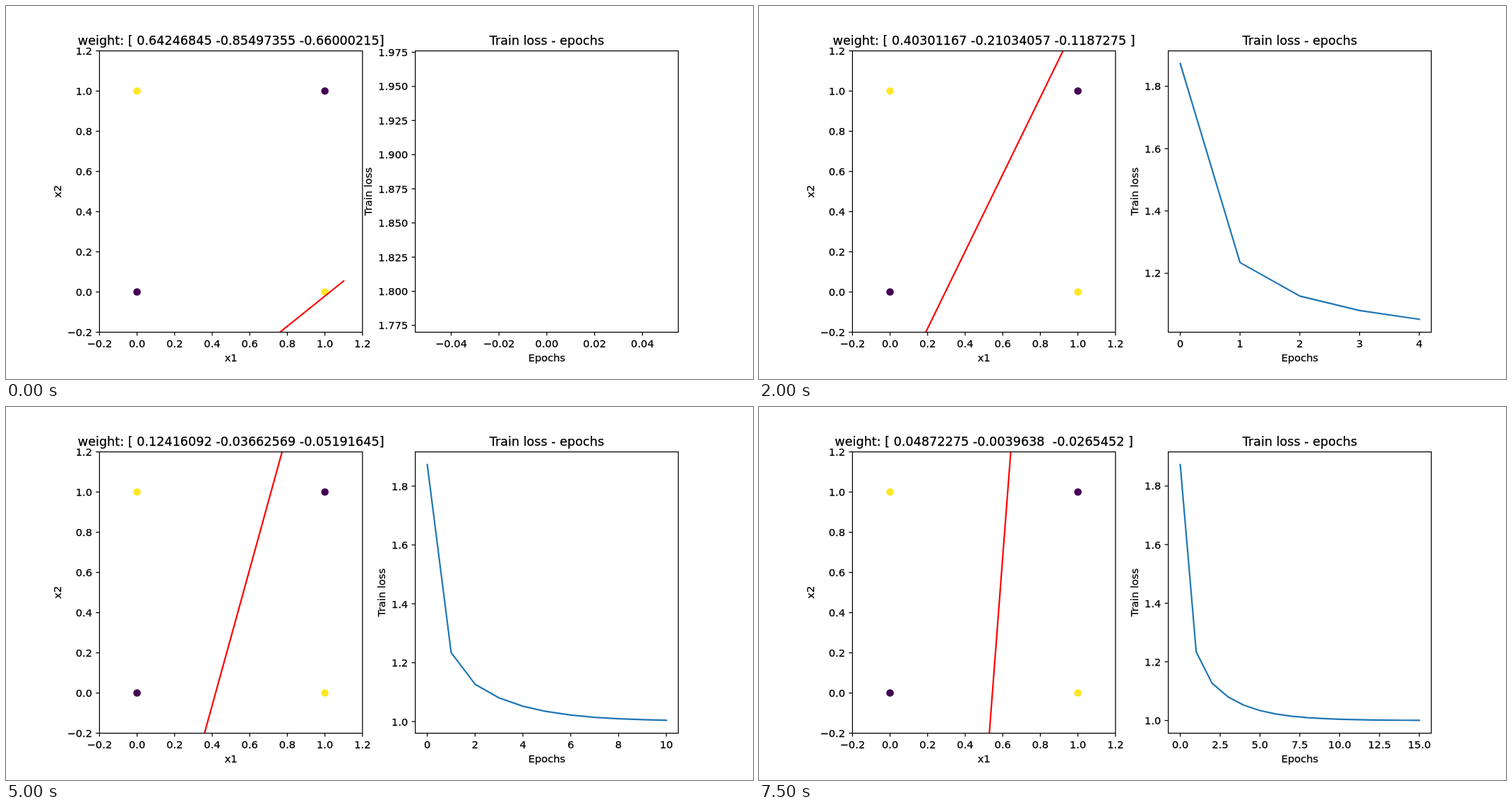
These frames come from a looping animation (1058 px wide and 529 px high, 8000 ms). An HTML page:

```html
<!DOCTYPE html>
<html lang="en">
<head>
<meta charset="utf-8">
<title>Training a linear model on XOR</title>
<style>
  html, body { margin: 0; width: 100%; height: 100%; overflow: hidden; background: #fff; }
  svg { display: block; width: 1058px; height: 529px; }
  text { font: 14.694px "DejaVu Sans", sans-serif; fill: #000; stroke: #000; stroke-width: .25px; }
  .title { font-size: 17.633px; }
  .mid { text-anchor: middle; }
  .end { text-anchor: end; }
  .axis { fill: none; stroke: #000; stroke-width: 1.25; }
  .plot { fill: none; stroke-width: 2.2; stroke-linecap: square; stroke-linejoin: round; }
</style>
</head>
<body>
<svg id="stage" viewBox="0 0 1058 529"></svg>
<script>
const STEP_MS = 500, EPOCHS = 16, RATE = 0.8;
const TOP = 63.5, BOTTOM = 462.5, WIDTH = 372.5;
const LEFT_X = 132.4, RIGHT_X = 579.7;
const stage = document.getElementById('stage');

// Gradient descent on mean squared error; XOR targets of ±1 cancel out of the gradient.
const moments = [[.5, .25, .5], [.25, .5, .5], [.5, .5, 1]];
const dot = (a, b) => a.reduce((sum, v, i) => sum + v * b[i], 0);
const gradient = w => moments.map(row => dot(row, w));

const weights = [[0.64246845, -0.85497355, -0.66000215]];
while (weights.length < EPOCHS) {
  const w = weights.at(-1), g = gradient(w);
  weights.push(w.map((v, i) => v - RATE * g[i]));
}
const losses = weights.map(w => 1 + dot(w, gradient(w)));

const text = (x, y, str, cls, extra = '') =>
  `<text x="${x}" y="${y}" class="${cls}" ${extra}>${str.replace(/ /g, '\u00a0')}</text>`;

const sideways = (x, str) => {
  const y = (TOP + BOTTOM) / 2;
  return text(x, y, str, 'mid', `transform="rotate(-90 ${x} ${y})"`);
};

// Smallest round step that keeps the axis within the given number of bins.
function ticks([lo, hi], bins) {
  const raw = (hi - lo) / bins;
  const power = Math.floor(Math.log10(raw));
  const lead = [1, 2, 2.5, 5, 10].find(s => s * 10 ** power >= raw - 1e-12);
  const step = lead * 10 ** power;
  const digits = Math.max(0, (lead === 2.5 ? 1 : 0) - power - (lead === 10 ? 1 : 0));
  const list = [];
  for (let i = Math.ceil(lo / step - 1e-9); i * step <= hi + 1e-9; i++) {
    list.push({ value: i * step, label: (i * step).toFixed(digits).replace('-', '\u2212') });
  }
  return list;
}

function makeAxes(left, xRange, yRange) {
  const scale = ([lo, hi], from, to) => v => from + (v - lo) / (hi - lo) * (to - from);
  return {
    left, xRange, yRange,
    x: scale(xRange, left, left + WIDTH),
    y: scale(yRange, BOTTOM, TOP)
  };
}

function drawFrame(axes, title, xLabel, yLabel) {
  const { left, x, y, xRange, yRange } = axes;
  const centre = left + WIDTH / 2;
  const yTicks = ticks(yRange, 9);
  let marks = `M${left} ${TOP}h${WIDTH}V${BOTTOM}h${-WIDTH}z`, labels = '';
  for (const t of ticks(xRange, 8)) {
    marks += `M${x(t.value)} ${BOTTOM}v5.1`;
    labels += text(x(t.value), 484.4, t.label, 'mid');
  }
  for (const t of yTicks) {
    marks += `M${left} ${y(t.value)}h-5.1`;
    labels += text(left - 10.3, y(t.value) + 5.4, t.label, 'end');
  }
  const em = 14.694;
  const labelWidth = s => em * [...s].reduce((sum, c) =>
    sum + (c === '.' ? .318 : c === '\u2212' ? .838 : .636), 0);
  const widest = Math.max(...yTicks.map(t => labelWidth(t.label)));
  return `<path class="axis" d="${marks}"/>` + labels +
    text(centre, 54.5, title, 'title mid') +
    text(centre, 504.4, xLabel, 'mid') +
    sideways(left - 19.2 - widest, yLabel);
}

const plot = (axes, points, color, clip) =>
  `<polyline class="plot" stroke="${color}" clip-path="url(#${clip})" points="${
    points.map(([px, py]) => axes.x(px) + ',' + axes.y(py)).join(' ')}"/>`;

// Trailing zeros become blanks, as in a padded array printout.
function formatWeights(w) {
  const cells = w.map(v => v.toFixed(8).replace(/0+$/, z => ' '.repeat(z.length)));
  const before = Math.max(...cells.map(c => c.indexOf('.')));
  const after = Math.max(...cells.map(c => c.trimEnd().length - c.indexOf('.')));
  return 'weight: [' + cells.map(c =>
    ' '.repeat(before - c.indexOf('.')) + c.slice(0, c.indexOf('.') + after)).join(' ') + ']';
}

function drawBoundary(w) {
  const axes = makeAxes(LEFT_X, [-.2, 1.2], [-.2, 1.2]);
  const [a, b, c] = w;
  const dots = [[0, 0], [0, 1], [1, 0], [1, 1]].map(([px, py]) =>
    `<circle cx="${axes.x(px)}" cy="${axes.y(py)}" r="5.3" fill="${px ^ py ? '#fde725' : '#440154'}"/>`);
  const line = [-.1, 1.1].map(px => [px, -(a * px + c) / b]);
  return dots.join('') + plot(axes, line, '#f00', 'clipLeft') +
    drawFrame(axes, formatWeights(w), 'x1', 'x2');
}

function drawLoss(epoch) {
  const shown = losses.slice(0, epoch + 1);
  const high = shown[0], low = shown.at(-1);
  const range = (lo, hi) => [lo - .05 * (hi - lo), hi + .05 * (hi - lo)];
  const axes = epoch
    ? makeAxes(RIGHT_X, range(0, epoch), range(low, high))
    : makeAxes(RIGHT_X, [-.055, .055], range(high * .95, high * 1.05));
  return (epoch ? plot(axes, shown.map((v, i) => [i, v]), '#1f77b4', 'clipRight') : '') +
    drawFrame(axes, 'Train loss - epochs', 'Epochs', 'Train loss');
}

const clip = (id, left) =>
  `<clipPath id="${id}"><rect x="${left}" y="${TOP}" width="${WIDTH}" height="${BOTTOM - TOP}"/></clipPath>`;
const defs = clip('clipLeft', LEFT_X) + clip('clipRight', RIGHT_X);

let current = -1;
function render(now) {
  const epoch = Math.floor(now / STEP_MS) % EPOCHS;
  if (epoch !== current) {
    current = epoch;
    stage.innerHTML = defs + drawBoundary(weights[epoch]) + drawLoss(epoch);
  }
}

const start = performance.now();
function tick() {
  render(performance.now() - start);
  requestAnimationFrame(tick);
}
tick();
</script>
</body>
</html>
```
